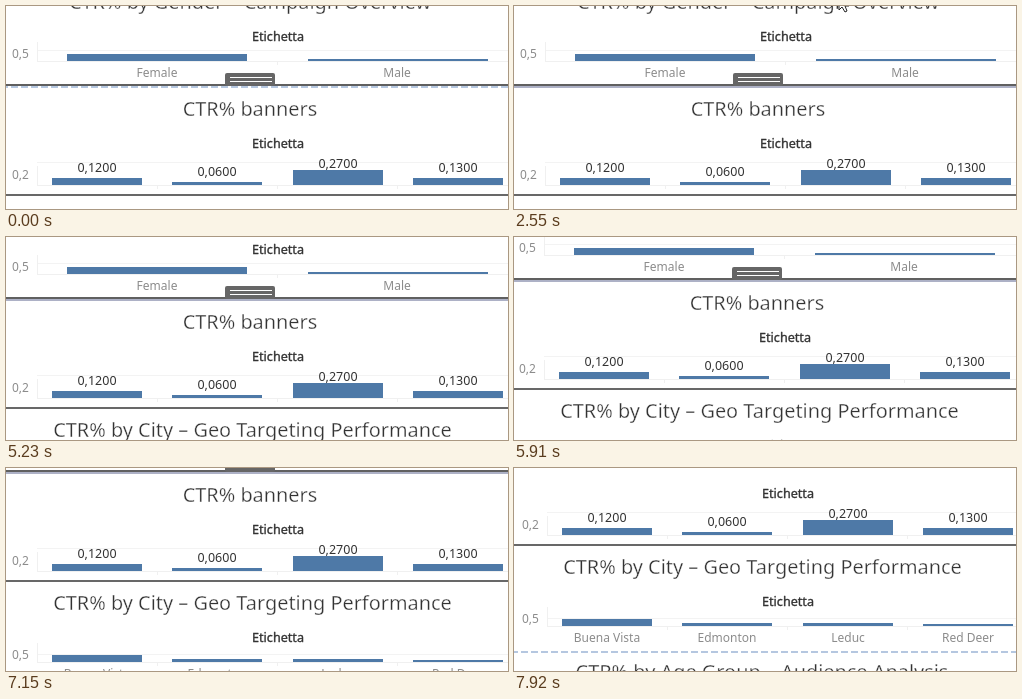
These frames come from a looping animation (502 by 203 pixels, 7990 ms). An HTML page with a canvas:

```html
<!DOCTYPE html>
<html lang="it">
<head>
<meta charset="utf-8">
<style>
html, body { margin: 0; width: 100%; height: 100%; overflow: hidden; background: #fff; }
canvas { display: block; }
</style>
</head>
<body>
<canvas id="stage" width="502" height="203"></canvas>
<script>
const ctx = document.getElementById('stage').getContext('2d');
const LOOP = 7990;
const FAMILY = '"Noto Sans", "Open Sans", sans-serif';
const BAR = '#4e79a7';
const COLUMNS = [46, 166, 287, 407];

// time, vertical offset, horizontal offset
const PATH = [
  [0, 0, 0], [2550, 0, 0], [2820, 4, 0], [4700, 4, 0],
  [5230, -18, 0], [5370, -20, 0], [5600, -20, 0],
  [5910, -37, -1], [6390, -51, -1], [6440, -51, -1],
  [7150, -76, 0], [7220, -78, 0], [7270, -78, 0],
  [7920, -112, 2], [LOOP, -112, 2]
];

function offsetAt(t) {
  const i = PATH.findIndex(p => p[0] > t);
  const a = PATH[i - 1], b = PATH[i];
  const k = (t - a[0]) / (b[0] - a[0]);
  return { y: Math.round(a[1] + (b[1] - a[1]) * k), x: Math.round(a[2] + (b[2] - a[2]) * k) };
}

// An outline in the text colour thickens the letters, a white one thins them.
function text(str, x, y, size, color, { align = 'center', outline } = {}) {
  ctx.font = size + 'px ' + FAMILY;
  ctx.textAlign = align;
  ctx.fillStyle = color;
  ctx.fillText(str, x, y);
  if (!outline) return;
  ctx.strokeStyle = outline;
  ctx.lineWidth = 0.35;
  ctx.lineJoin = 'round';
  ctx.strokeText(str, x, y);
}

function rect(x, y, w, h, color) {
  ctx.fillStyle = color;
  ctx.fillRect(x, y, w, h);
}

const title = (str, x, y) => text(str, x, y, 19.9, '#333', { outline: '#fff' });
const header = y => text('Etichetta', 272, y, 12.6, '#333', { outline: '#333' });
const label = (str, x, y) => text(str, x, y, 12, '#8c8c8c');

function axis(tick, base, tickY, gridY, columns) {
  rect(31, gridY, 480, 1, '#f3f3f3');
  rect(31, base, 480, 1, '#f0f0f0');
  rect(31, base - 19, 1, 19, '#f0f0f0');
  for (let i = 1; i < columns; i++) rect(31 + Math.round(i * 480 / columns), base, 1, 4, '#f0f0f0');
  text(tick, 6, tickY, 12, '#8c8c8c', { align: 'left' });
}

function bars(xs, width, base, heights) {
  xs.forEach((x, i) => rect(x, base - heights[i], width, heights[i], BAR));
}

function rule(y, color, dash = []) {
  ctx.strokeStyle = color;
  ctx.lineWidth = 2;
  ctx.setLineDash(dash);
  ctx.beginPath();
  ctx.moveTo(-5, y);
  ctx.lineTo(510, y);
  ctx.stroke();
  ctx.setLineDash([]);
}

function handle() {
  ctx.fillStyle = '#666';
  ctx.beginPath();
  ctx.roundRect(219, 67, 50, 13, 2);
  ctx.fill();
  rect(224, 71, 42, 1, '#fff');
  rect(224, 75, 42, 1, '#fff');
}

function cursor(x, y) {
  ctx.beginPath();
  [[0, 0], [0, 14], [3, 11], [6, 16], [8, 15], [6, 10], [10, 10]]
    .forEach(([dx, dy]) => ctx.lineTo(x + dx, y + dy));
  ctx.closePath();
  ctx.fillStyle = '#fff';
  ctx.fill();
  ctx.strokeStyle = '#222';
  ctx.lineWidth = 1;
  ctx.stroke();
}

function genderPanel(t) {
  title('CTR% by Gender – Campaign Overview', 244, 3);
  header(35);
  axis('0,5', 55, 52, 44, 2);
  bars([61, 302], 180, 55, [7, 2]);
  label('Female', 151, 71);
  label('Male', 391, 71);
  rule(79, '#606060');
  if (t < 2550) rule(81, '#b5c7e0', [7, 3]);
  else rule(81, '#adb1c6');
  handle();
}

function bannerPanel() {
  title('CTR% banners', 244, 110);
  header(142);
  axis('0,2', 179, 173, 156, 4);
  const heights = [7, 3, 15, 7];
  bars(COLUMNS, 90, 179, heights);
  ['0,1200', '0,0600', '0,2700', '0,1300'].forEach((str, i) =>
    text(str, COLUMNS[i] + 45, [166, 170, 162, 166][i], 12.5, '#333'));
  rule(189, '#686868');
}

function cityPanel() {
  title('CTR% by City – Geo Targeting Performance', 246.5, 218);
  header(250);
  axis('0,5', 270, 267, 262, 4);
  bars(COLUMNS, 90, 270, [7, 3, 3, 2]);
  ['Buena Vista', 'Edmonton', 'Leduc', 'Red Deer'].forEach((str, i) =>
    label(str, COLUMNS[i] + 45, 286));
  rule(296, '#b5c7e0', [7, 3]);
  title('CTR% by Age Group – Audience Analysis', 246, 323);
}

function draw(now) {
  const t = now % LOOP;
  const { x, y } = offsetAt(t);
  ctx.setTransform(1, 0, 0, 1, 0, 0);
  rect(0, 0, 502, 203, '#fff');
  ctx.translate(x, y);
  genderPanel(t);
  bannerPanel();
  cityPanel();
  ctx.setTransform(1, 0, 0, 1, 0, 0);
  if (t >= 2550 && t < 2640) cursor(325, -10);
  requestAnimationFrame(draw);
}
requestAnimationFrame(draw);
</script>
</body>
</html>
```
